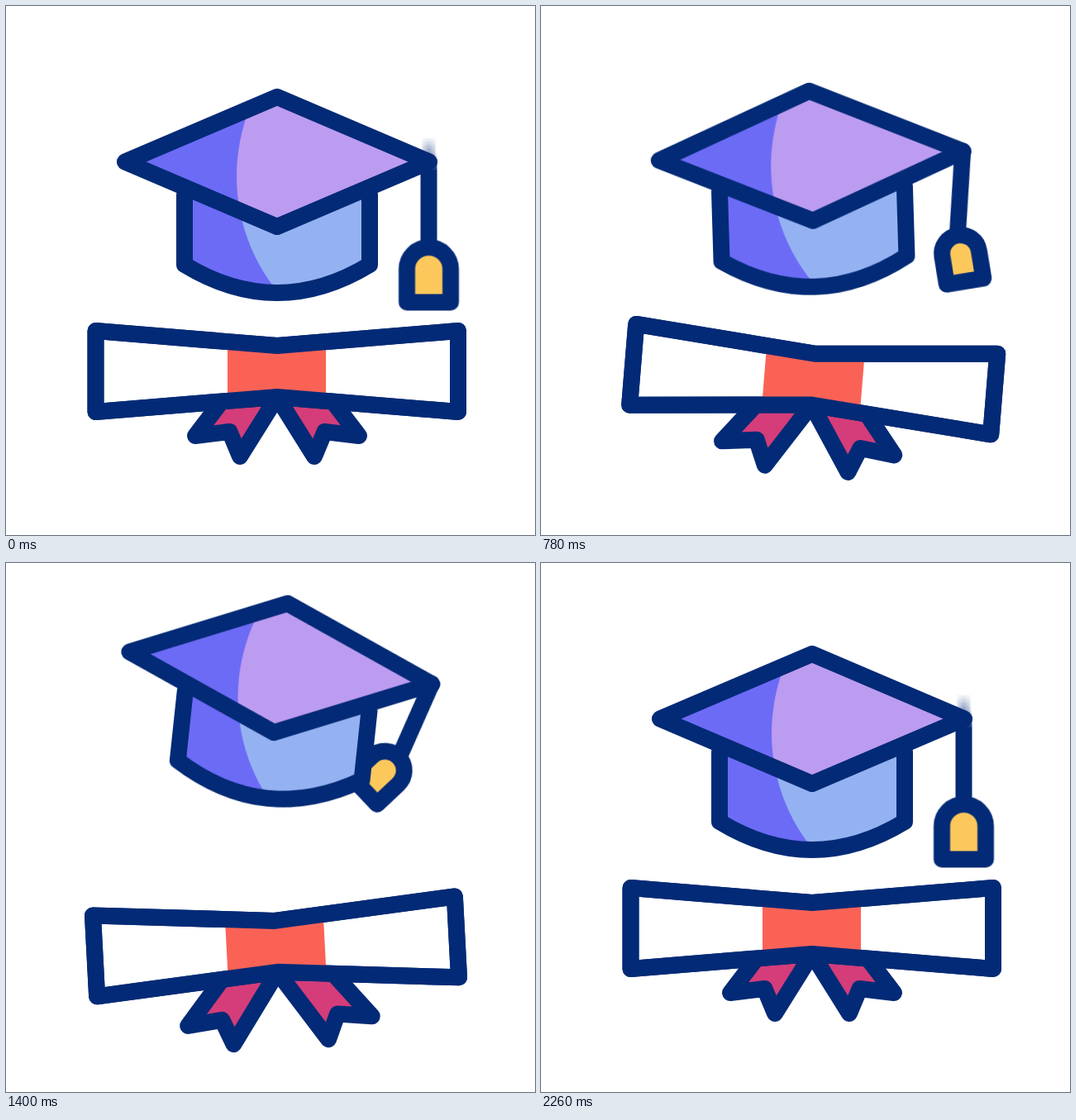
Write an HTML page that moves like this. It is 640 px wide and 640 px high and loops after 2.4 s.

```html
<!DOCTYPE html>
<html lang="en">
<head>
<meta charset="utf-8">
<title>Graduation cap and diploma</title>
<style>
  @property --x { syntax: "<number>"; inherits: true; initial-value: 0; }
  @property --y { syntax: "<number>"; inherits: true; initial-value: 103; }
  @property --cos { syntax: "<number>"; inherits: true; initial-value: 1; }
  @property --sin { syntax: "<number>"; inherits: true; initial-value: 0; }

  html, body { margin: 0; width: 100%; height: 100%; overflow: hidden; background: #fff; }
  svg { display: block; width: 100%; height: 100%; }

  .line {
    fill: none;
    stroke: #032a76;
    stroke-width: 20;
    stroke-linecap: round;
    stroke-linejoin: round;
  }
  .shade { fill: #6c6bf5; }

  .cap, .scroll, .tail, .tassel {
    animation: 2400ms cubic-bezier(.3333, 0, .6667, 1) infinite;
  }
  .cap { transform-origin: 328px 230px; animation-name: hop; }
  .scroll { transform-origin: 328px 466px; animation-name: drop, tilt; }
  .tail { fill: #d43d79; animation-name: stretch; }
  .tassel { animation-name: swing; }

  /* The cord and tag blend linearly between poses, so the tag shrinks mid-swing. */
  .cord, .tag { vector-effect: non-scaling-stroke; transform-origin: 0 0; }
  .cord { transform: matrix(1, 0, var(--x), var(--y), 0, 0); }
  .tag {
    fill: #fcc85c;
    transform: matrix(var(--cos), var(--sin), calc(-1 * var(--sin)), var(--cos), var(--x), var(--y));
  }

  @keyframes hop {
    0%, 8.3333%, 91.6667%, 100% { transform: translateY(0) rotate(0deg); }
    25% { transform: translateY(15px) rotate(-5deg); }
    50% { transform: translateY(-87px) rotate(10deg); }
    75% { transform: translateY(9.6px) rotate(-5deg); }
  }
  @keyframes swing {
    0%, 8.3333%, 91.6667%, 100% { --x: 0; --y: 103; --cos: 1; --sin: 0; }
    25% { --x: 0; --y: 104; --cos: .92; --sin: -.39; }
    50% { --x: -42.5; --y: 90; --cos: .564; --sin: .886; }
    75% { --x: 7; --y: 97.5; --cos: .945; --sin: -.326; }
  }
  @keyframes drop {
    0%, 25%, 66.6667%, 100% { translate: 0 0; }
    50% { translate: 0 44px; }
  }
  @keyframes tilt {
    0%, 8.3333%, 91.6667%, 100% { rotate: 0deg; }
    25% { rotate: 2.1deg; }
    41.6667% { rotate: 8.1deg; }
    58.3333% { rotate: -3deg; }
    75% { rotate: 1.6deg; }
  }
  @keyframes stretch {
    0%, 25%, 66.6667%, 100% { d: path("M261 478L229 520L270.5 515L283 545L328 473"); }
    50% { d: path("M261 478L204 545L245.5 540L258 570L328 473"); }
  }
</style>
</head>
<body>
<svg viewBox="0 0 640 640">
  <defs>
    <path id="body" d="M216 228V313Q328 381 440 313V228"/>
    <path id="board" d="M328 110L512 188.5L328 267L144 188.5Z"/>
    <clipPath id="in-body"><use href="#body"/></clipPath>
    <clipPath id="in-board"><use href="#board"/></clipPath>
    <circle id="light" cx="501" cy="206" r="222"/>
  </defs>

  <g class="scroll">
    <path class="line tail" d="M261 478L229 520L270.5 515L283 545L328 473"/>
    <g transform="translate(656 0) scale(-1 1)">
      <path class="line tail" d="M261 478L229 520L270.5 515L283 545L328 473"/>
    </g>
    <path class="line" style="fill:#fff" d="M108.5 393L328 411L547 393V491L328 473L108.5 491Z"/>
    <path fill="#fb6256" d="M268 406L328 411L387 406V478L328 473L268 478Z"/>
    <path class="line" d="M108.5 393L328 411L547 393V491L328 473L108.5 491Z"/>
  </g>

  <g class="cap">
    <g class="tassel" transform="translate(511.5 188.5)">
      <path class="line cord" d="M0 0V1"/>
      <path class="line tag" d="M-26.5 67V27A26.5 26.5 0 0 1 26.5 27V67Z"/>
    </g>
    <use class="shade" href="#body"/>
    <g clip-path="url(#in-body)"><use href="#light" fill="#94b2f2"/></g>
    <use class="line" href="#body"/>
    <use class="shade" href="#board"/>
    <g clip-path="url(#in-board)"><use href="#light" fill="#bc9cf0"/></g>
    <use class="line" href="#board"/>
  </g>
</svg>
</body>
</html>
```
